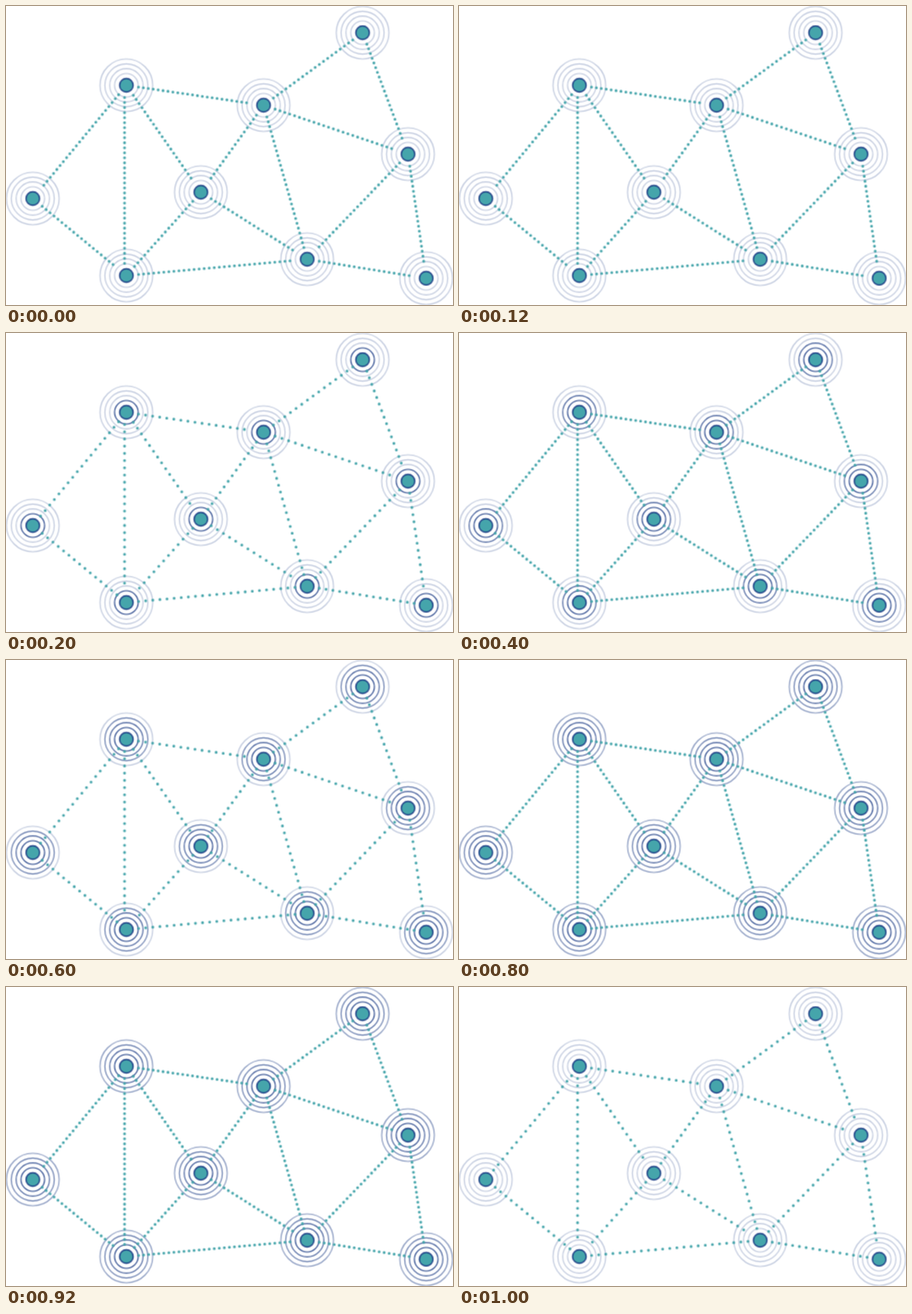
Write an HTML page that moves like this. It is 492 by 330 pixels and loops after 1.2 s.

```html
<!DOCTYPE html>
<html lang="en">
<head>
<meta charset="utf-8">
<title>Pulsing network</title>
<style>
  html, body { margin: 0; width: 100%; height: 100%; overflow: hidden; background: #fff; }
  svg { display: block; width: 492px; height: 330px; }
  .link {
    fill: none; stroke: #45a5ab; stroke-width: 3.1; stroke-linecap: round;
    animation: dots 400ms step-end infinite;
  }
  .core { fill: #45a5ab; stroke: #1d3d86; stroke-width: 1.4; }
  .ring { fill: none; stroke: #1d3d86; stroke-width: 1.1; opacity: .3; }
  .ring1 { animation: ring1 1200ms step-end infinite; }
  .ring2 { animation: ring2 1200ms step-end infinite; }
  .ring3 { animation: ring3 1200ms step-end infinite; }
  .ring4 { animation: ring4 1200ms step-end infinite; }

  @keyframes dots {
    0% { stroke-dasharray: 0 var(--tight); }
    50% { stroke-dasharray: 0 var(--loose); }
  }
  @keyframes ring1 { 0%, 83.333% { opacity: .3; } 16.667% { opacity: var(--lit); } }
  @keyframes ring2 { 0%, 83.333% { opacity: .3; } 33.333% { opacity: var(--lit); } }
  @keyframes ring3 { 0%, 83.333% { opacity: .3; } 50% { opacity: var(--lit); } }
  @keyframes ring4 { 0%, 83.333% { opacity: .3; } 66.667% { opacity: var(--lit); } }
</style>
</head>
<body>
<svg viewBox="-.5 -.5 492 330"></svg>
<script>
  const svg = document.querySelector('svg');
  const inset = 13.5;

  const nodes = {
    A: [132, 87], B: [392, 29], C: [283, 109], D: [442, 163], E: [29, 212],
    F: [214, 205], G: [132, 297], H: [331, 279], I: [462, 300]
  };
  const links = 'AE AG AF AC CB CD CF CH BD DH DI HI GH FH FG EG'.split(' ');

  function add(tag, attrs) {
    const el = document.createElementNS('http://www.w3.org/2000/svg', tag);
    for (const key in attrs) el.setAttribute(key, attrs[key]);
    svg.append(el);
  }

  // Whole number of gaps, so a dot sits on both ends.
  const fit = (length, pitch) => (length / Math.round(length / pitch)).toFixed(3);

  function addLink([from, to]) {
    const [ax, ay] = nodes[from], [bx, by] = nodes[to];
    const dist = Math.hypot(bx - ax, by - ay);
    const ux = (bx - ax) / dist, uy = (by - ay) / dist;
    const length = dist - 2 * inset;
    const shift = ax === bx ? -2 : 0; // the upright link hangs left of centre
    add('line', {
      x1: ax + ux * inset + shift, y1: ay + uy * inset,
      x2: bx - ux * inset + shift, y2: by - uy * inset,
      class: 'link',
      style: `--tight: ${fit(length, 5.55)}; --loose: ${fit(length, 7.8)}`
    });
  }

  const centres = Object.values(nodes);
  for (const [cx, cy] of centres) {
    for (let i = 0; i < 4; i++) {
      add('circle', {
        cx, cy, r: 13 + i * 16 / 3,
        class: `ring ring${i + 1}`, style: `--lit: ${1 - i * .15}`
      });
    }
  }
  links.forEach(addLink);
  for (const [cx, cy] of centres) add('circle', { cx, cy, r: 7.5, class: 'core' });
</script>
</body>
</html>
```
